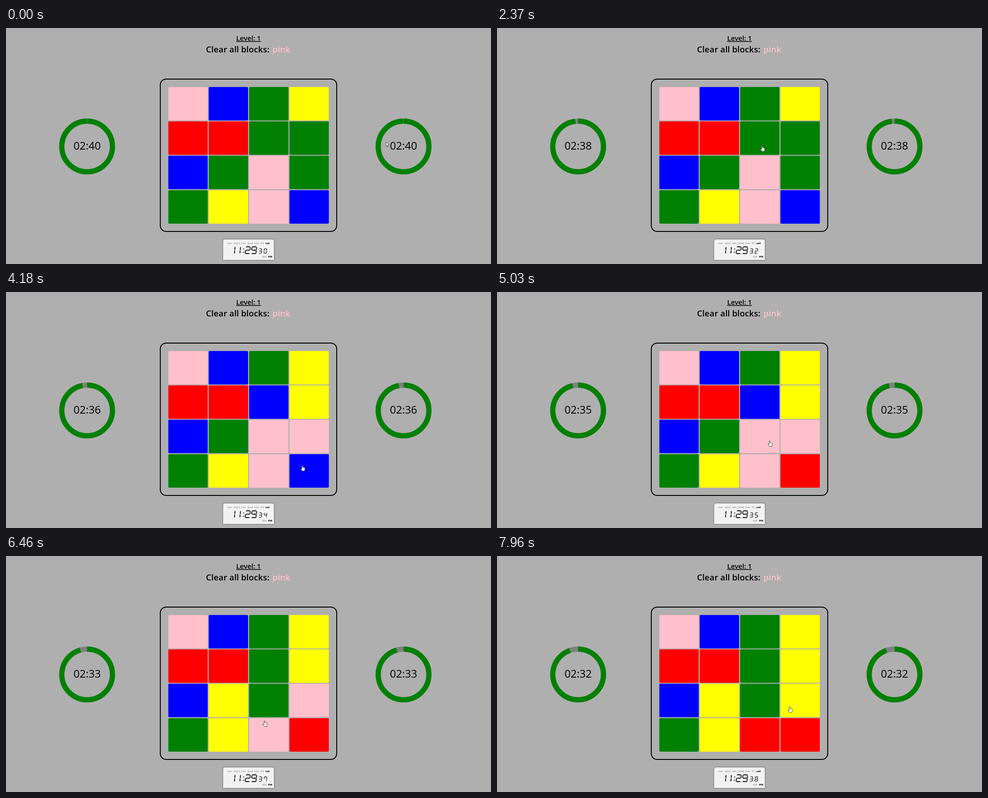
Write an HTML page that moves like this. It is 1072 by 522 pixels and loops after 8000 ms.

```html
<!DOCTYPE html>
<html lang="en">
<head>
<meta charset="utf-8">
<title>Clear the blocks</title>
<style>
  html, body { margin: 0; width: 100%; height: 100%; overflow: hidden; background: #afafaf; }
  svg { display: block; width: 1072px; height: 522px; font-family: "Open Sans", "Noto Sans", sans-serif; }
  .head { font-weight: 600; }
  .time { font-size: 23.6px; text-anchor: middle; }
  .tiny { font: bold 5.4px "DejaVu Sans", sans-serif; text-anchor: middle; fill: #aaa; }
  .tiny .on { fill: #111; }
  .ring { fill: none; stroke-width: 11.4; }
  .lcd { fill: none; stroke: #111; }
  .panel { filter: drop-shadow(0 0 1.5px #444); }
  .cursor { fill: #fff; stroke: #222; stroke-width: .8; stroke-linejoin: round; }
</style>
</head>
<body>
<svg viewBox="0 0 1072 522">
  <g class="head">
    <text x="536" y="28" font-size="15.2" text-anchor="middle" text-decoration="underline">Level: 1</text>
    <text x="442" y="54" font-size="18.7">Clear all blocks:</text>
    <text x="589" y="54" font-size="18.7" fill="pink">pink</text>
  </g>
  <rect x="341" y="113" width="390" height="337" rx="13" fill="none" stroke="#000" stroke-width="2"/>
  <g id="tiles"></g>
  <g id="timers"></g>
  <path class="panel" fill="#f2f2f2" d="M480 513V472Q480 467.500 484.500 467.500H587.500Q592 467.500 592 472V513Z"/>
  <g class="tiny" id="labels"></g>
  <path class="lcd" id="clock" stroke-width="1.9"/>
  <path class="lcd" id="seconds" stroke-width="1.3"/>
  <path fill="#111" d="M524.300 488h2v2h-2zM523.700 495h2v2h-2z"/>
  <path class="cursor" id="cursor"/>
</svg>
<script>
const $ = id => document.getElementById(id);
const LOOP = 8000;
const COLORS = { p: 'pink', b: 'blue', g: 'green', y: 'yellow', r: 'red' };
const START = 'pbgyrrggbgpggypb';
// Time, tile index, new colour
const CLICKS = [
  [2480, 6, 'b'], [2950, 7, 'y'], [3550, 11, 'p'], [4200, 15, 'r'], [5100, 10, 'g'],
  [5520, 6, 'g'], [6020, 9, 'y'], [6600, 14, 'r'], [7330, 11, 'y']
];
// Time, x, y of the pointer tip
const MOVES = [
  [0, 840, 252], [700, 840, 252], [1440, 758.5, 226.5], [2370, 586, 260], [2520, 586, 260],
  [2850, 650, 265], [3000, 650, 265], [3290, 650, 296.5], [3620, 650, 297], [4050, 655, 383],
  [4300, 655, 383], [4850, 602.5, 328.5], [5150, 602.5, 328.5], [5430, 580, 262],
  [5600, 580, 262], [5930, 495, 318], [6080, 495, 318], [6400, 571.5, 364],
  [6680, 571.5, 364], [7220, 647, 333], [LOOP, 647, 333]
];
const ARROW = 'M0 0V9.600L2.200 7.700L3.700 11L5.200 10.300L3.700 7.100H6.600Z';
const HAND = 'M-1 1Q0 -.6 1 1V4.600L5 5.300Q6.200 5.600 6 7.200L5.200 10.500V13H-.2L-3.300 9.200Q-4 7.600 -2.600 7.600L-1 9Z';

// Seven segments on a cell one wide and two high
const SEGMENTS = {
  a: [0, 0, 1, 0], b: [1, 0, 1, 1], c: [1, 1, 1, 2], d: [0, 2, 1, 2],
  e: [0, 1, 0, 2], f: [0, 0, 0, 1], g: [0, 1, 1, 1]
};
const DIGITS = 'abcdef bc abged abgcd fgbc afgcd afgcde fabc abcdefg abcdfg'.split(' ');

function digit(n, x, y, w, h) {
  const point = (u, v) => `${x + u * w + (2 - v) * h * .045} ${y + v * h / 2}`;
  return [...DIGITS[n]].map(s => {
    const [u0, v0, u1, v1] = SEGMENTS[s];
    const du = (u1 - u0) * .06, dv = (v1 - v0) * .08;
    return `M${point(u0 + du, v0 + dv)}L${point(u1 - du, v1 - dv)}`;
  }).join('');
}

$('tiles').innerHTML = [...START].map((c, i) =>
  `<rect x="${358.8 + i % 4 * 89.25}" y="${130.4 + (i >> 2) * 76.1}" width="87" height="74" rx="2"/>`).join('');

$('timers').innerHTML = [179.3, 878.7].map(x => `
  <circle class="ring" cx="${x}" cy="262" r="56" stroke="gray"/>
  <circle class="ring left" cx="${x}" cy="262" r="56" stroke="green" pathLength="360" transform="rotate(-90 ${x} 262)"/>
  <text class="time" x="${x}" y="269"></text>`).join('');

const label = (text, x, y, on) => `<text x="${x}" y="${y}" class="${on ? 'on' : ''}">${text}</text>`;
const DAY_X = [494.5, 510, 525, 539.5, 554.5, 566.5, 578];
$('labels').innerHTML =
  'sun mon tue wed thu fri sat'.split(' ').map((d, i) => label(d, DAY_X[i], 478, i === 6)).join('') +
  label('AM', 570.5, 508) + label('PM', 584, 508, true);

$('clock').setAttribute('d',
  digit(1, 495, 484, 10, 15) + digit(1, 507, 484, 10, 15) +
  digit(2, 528.5, 484, 10, 15) + digit(9, 542.5, 484, 10, 15));

const tiles = [...$('tiles').children];
const rings = document.querySelectorAll('.left');
const times = document.querySelectorAll('.time');

function pointerAt(t) {
  const i = MOVES.findIndex(m => m[0] > t);
  const [t0, x0, y0] = MOVES[i - 1], [t1, x1, y1] = MOVES[i];
  const k = (t - t0) / (t1 - t0), e = k * k * (3 - 2 * k);
  return [x0 + (x1 - x0) * e, y0 + (y1 - y0) * e];
}

function draw() {
  const t = performance.now() % LOOP;

  const board = [...START];
  for (const [at, i, c] of CLICKS) if (t >= at) board[i] = c;
  tiles.forEach((tile, i) => tile.setAttribute('fill', COLORS[board[i]]));

  const ticks = Math.floor((t + 600) / 1000);
  const gap = (t + 400) / 1000 * 360 / 160;
  rings.forEach(r => r.setAttribute('stroke-dasharray', `${360 - gap} 360`));
  const left = 160 - ticks;
  const text = `0${Math.floor(left / 60)}:${String(left % 60).padStart(2, '0')}`;
  times.forEach(el => { el.textContent = text; });

  const sec = 30 + ticks;
  $('seconds').setAttribute('d',
    digit(Math.floor(sec / 10), 559, 488.3, 5.5, 10) + digit(sec % 10, 570, 488.3, 5.5, 10));

  const [x, y] = pointerAt(t);
  const over = x > 359 && x < 714 && y > 130 && y < 433;
  $('cursor').setAttribute('d', over ? HAND : ARROW);
  $('cursor').setAttribute('transform', `translate(${x} ${y})`);

  requestAnimationFrame(draw);
}
draw();
</script>
</body>
</html>
```
